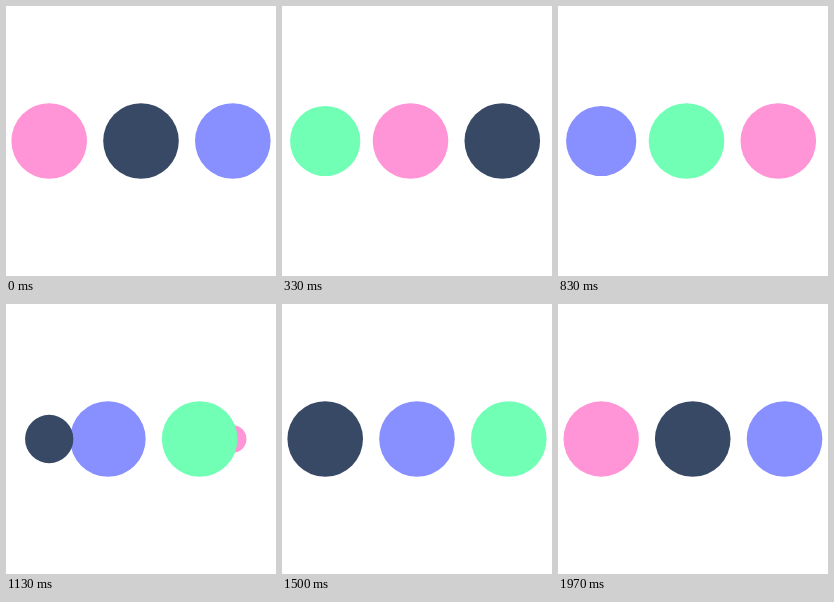
Recreate the animation shown at these times as an HTML page. Size 270 px wide and 270 px high, loop 2000 ms.

```html
<!DOCTYPE html>
<html lang="en">
<head>
<meta charset="utf-8">
<title>Loading dots</title>
<style>
  html, body { margin: 0; width: 100%; height: 100%; overflow: hidden; background: #fff; }
  svg { display: block; width: 100%; height: 100%; }
</style>
</head>
<body>
<svg id="stage" viewBox="0 0 270 270"></svg>
<script>
const LOOP = 2000;
const STEPS = 60;
const RADIUS = 37.8;
const LEFT = 43.2, MIDDLE = 135, RIGHT = 226.8;
const BLUE = '#888fff', GREEN = '#70ffb5', PINK = '#ff94d6', DARK = '#384966';
const COLORS = [BLUE, GREEN, PINK, DARK];
const LEAVING = [BLUE, DARK, PINK, GREEN];

const stage = document.getElementById('stage');

function makeCircle(color) {
  const circle = document.createElementNS('http://www.w3.org/2000/svg', 'circle');
  circle.setAttribute('cy', 135);
  circle.setAttribute('fill', color);
  return stage.appendChild(circle);
}

function place(circle, x, r) {
  circle.setAttribute('cx', x);
  circle.setAttribute('r', r);
}

const leaving = makeCircle(BLUE);
const dots = COLORS.map(makeCircle);

// cubic-bezier(0, 0.5, 0.5, 1)
function ease(x) {
  let low = 0, high = 1;
  for (let i = 0; i < 30; i++) {
    const s = (low + high) / 2;
    if (1.5 * s * s - 0.5 * s ** 3 < x) low = s;
    else high = s;
  }
  const s = (low + high) / 2, q = 1 - s;
  return 1.5 * q * q * s + 3 * q * s * s + s ** 3;
}

const mix = (a, b, p) => a + (b - a) * p;

function render(ms) {
  // 30 steps per second, switching on whole hundredths
  const step = Math.floor((Math.floor((ms % LOOP) / 10) + 0.5) * 0.3);
  const beat = step * 4 / STEPS;
  const segment = Math.floor(beat);
  const p = ease(beat - segment);

  leaving.setAttribute('fill', LEAVING[segment]);
  place(leaving, RIGHT, RADIUS * (1 - p));

  dots.forEach((dot, i) => {
    const phase = (segment + i) % 4;
    if (phase === 0) place(dot, LEFT, 0);
    else if (phase === 1) place(dot, LEFT, RADIUS * p);
    else if (phase === 2) place(dot, mix(LEFT, MIDDLE, p), RADIUS);
    else place(dot, mix(MIDDLE, RIGHT, p), RADIUS);
  });
}

const start = performance.now();
function tick() {
  render(performance.now() - start);
  requestAnimationFrame(tick);
}
tick();
</script>
</body>
</html>
```
